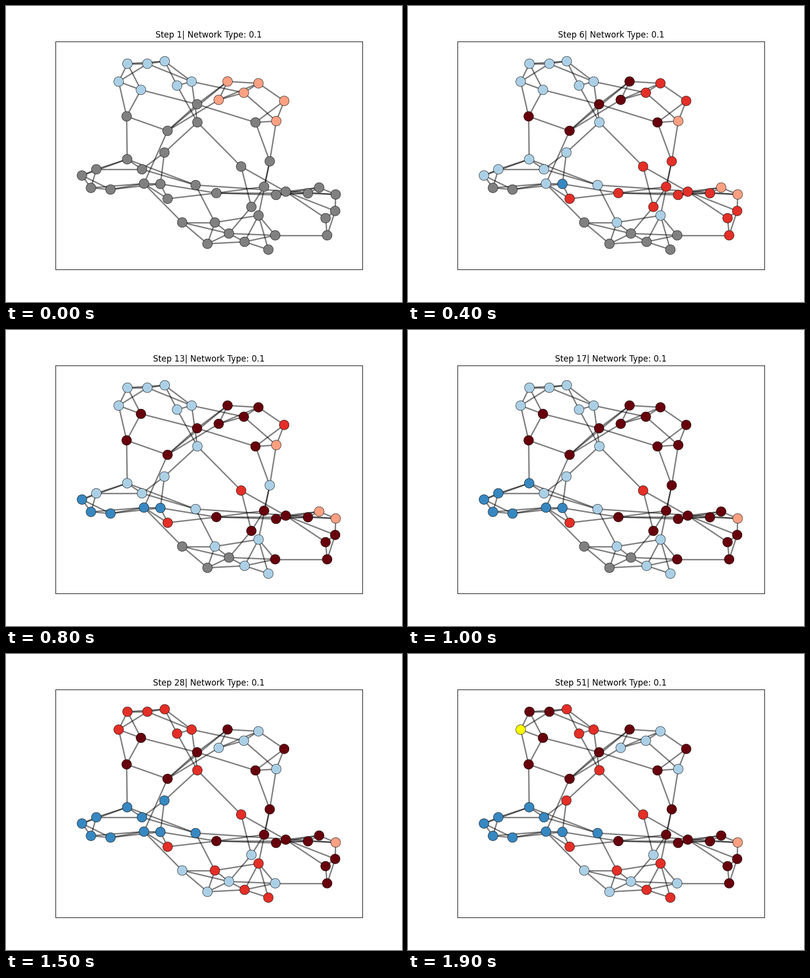
Animation of 800x600 px, one loop 2 s. Source, as a matplotlib script:

```python
import matplotlib.pyplot as plt
from matplotlib.animation import FuncAnimation
from matplotlib.collections import LineCollection

FRAMES, INTERVAL = 20, 100

COLORS = {
    "grey": "gray",
    "pale": plt.cm.Blues(0.333),
    "blue": plt.cm.Blues(0.666),
    "peach": plt.cm.Reds(0.333),
    "red": plt.cm.Reds(0.666),
    "dark": plt.cm.Reds(1.0),
    "yellow": "yellow",
}

# Node centres in stage pixels, y pointing down
NODES = dict(
    A=(245.4, 117), B=(285.6, 117), C=(320.7, 112), D=(227.6, 153.3),
    E=(272.6, 170), F=(345.6, 161.3), G=(375, 153.2), H=(386, 199.2),
    I=(386.6, 235.7), J=(243.7, 223.7), K=(326.4, 253), L=(320, 297),
    M=(244.8, 310.6), N=(274.7, 331), O=(182.5, 331), P=(153.5, 343.6),
    Q=(171.6, 368.6), R=(211.2, 372), S=(278.7, 360), T=(312, 360.7),
    U=(326.6, 390.7), V=(383, 363), W=(425, 379.2), X=(475, 325.4),
    Y=(532.8, 314.8), Z=(504, 236), a=(546, 233.2), b=(562, 192.4),
    c=(510, 156.7), d=(480.5, 175.8), e=(447.6, 153), f=(429.7, 190.2),
    g=(521.4, 366.3), h=(545.6, 383), i=(565.2, 376.3), j=(610, 379.6),
    k=(632.6, 368), l=(666, 382), m=(665, 415.4), n=(645.6, 430),
    o=(648.8, 464.8), p=(543.8, 464.8), q=(510.2, 424.6), r=(495.7, 407.2),
    s=(482, 478), t=(530, 493.8), u=(450.4, 461.2), v=(422, 438.8),
    w=(407, 482), x=(356, 438.8),
)

# Small-world graph: a ring joined to its two next neighbours, partly rewired
RING = "YZabdcfeKHJEDABCGFILVNMOPQRSTUWhjklmoniXruxvwsptqg"
CUT = "bd HJ LV pt qg FL IV Uh km lo oi nX ir Xu rx vs wp tg gZ".split()
ADDED = "JM ZH dG LT Vv Vl IX SK Sx im ik op rg gW vq uw us up sq".split()

STEPS = [1, 2, 3, 4, 6, 7, 9, 11, 13, 15, 17, 19, 21, 23, 25, 28, 32, 37, 43, 51]

# (frame, colour, nodes that take it)
EVENTS = [
    (0, "pale", "ABCDEFG"), (0, "peach", "abcdef"),
    (1, "peach", "HZKYgijklhW"), (1, "pale", "ILMN"),
    (2, "red", "bcdefKXYghijmnorWU"), (2, "pale", "OV"), (2, "blue", "T"),
    (3, "dark", "HK"), (3, "pale", "PS"),
    (4, "dark", "efZJ"), (4, "pale", "vq"),
    (5, "dark", "Eim"), (5, "pale", "RY"),
    (6, "dark", "nop"), (6, "pale", "st"),
    (7, "blue", "SR"), (7, "dark", "gWj"),
    (8, "blue", "QP"), (8, "dark", "cdhr"),
    (9, "blue", "O"), (9, "dark", "baY"),
    (10, "blue", "M"), (10, "dark", "k"),
    (11, "blue", "NVL"), (11, "red", "vq"),
    (12, "blue", "I"), (12, "red", "st"),
    (13, "pale", "rxwup"),
    (14, "pale", "acdf"),
    (15, "red", "ABCDFGI"),
    (16, "red", "L"),
    (17, "dark", "A"),
    (18, "dark", "B"),
    (19, "yellow", "D"),
]


def build_edges():
    n = len(RING)
    ring = [RING[k] + RING[(k + gap) % n] for gap in (1, 2) for k in range(n)]
    return [pair for pair in ring if pair not in CUT] + ADDED


def node_colors(frame):
    state = dict.fromkeys(NODES, "grey")
    for start, color, names in EVENTS:
        if start <= frame:
            state.update(dict.fromkeys(names, color))
    return [COLORS[c] for c in state.values()]


plt.rcParams["font.family"] = "DejaVu Sans"
fig = plt.figure(figsize=(8, 6), dpi=100, facecolor="white")
ax = fig.add_axes([0.125, 0.11, 0.775, 0.77])
ax.set(xlim=(100, 720), ylim=(534, 72), xticks=[], yticks=[])

lines = [(NODES[a], NODES[b]) for a, b in build_edges()]
ax.add_collection(LineCollection(lines, colors="black", linewidths=2,
                                 alpha=0.5, zorder=1))
xs, ys = zip(*NODES.values())
dots = ax.scatter(xs, ys, s=200, edgecolors="black", linewidths=0.5, zorder=2)
title = ax.set_title("", fontsize=12)


def draw(frame):
    dots.set_facecolor(node_colors(frame))
    title.set_text(f"Step {STEPS[frame]}| Network Type: 0.1")
    return dots, title


anim = FuncAnimation(fig, draw, frames=FRAMES, interval=INTERVAL,
                     init_func=lambda: draw(0), repeat=True, repeat_delay=0)
plt.show()
```
